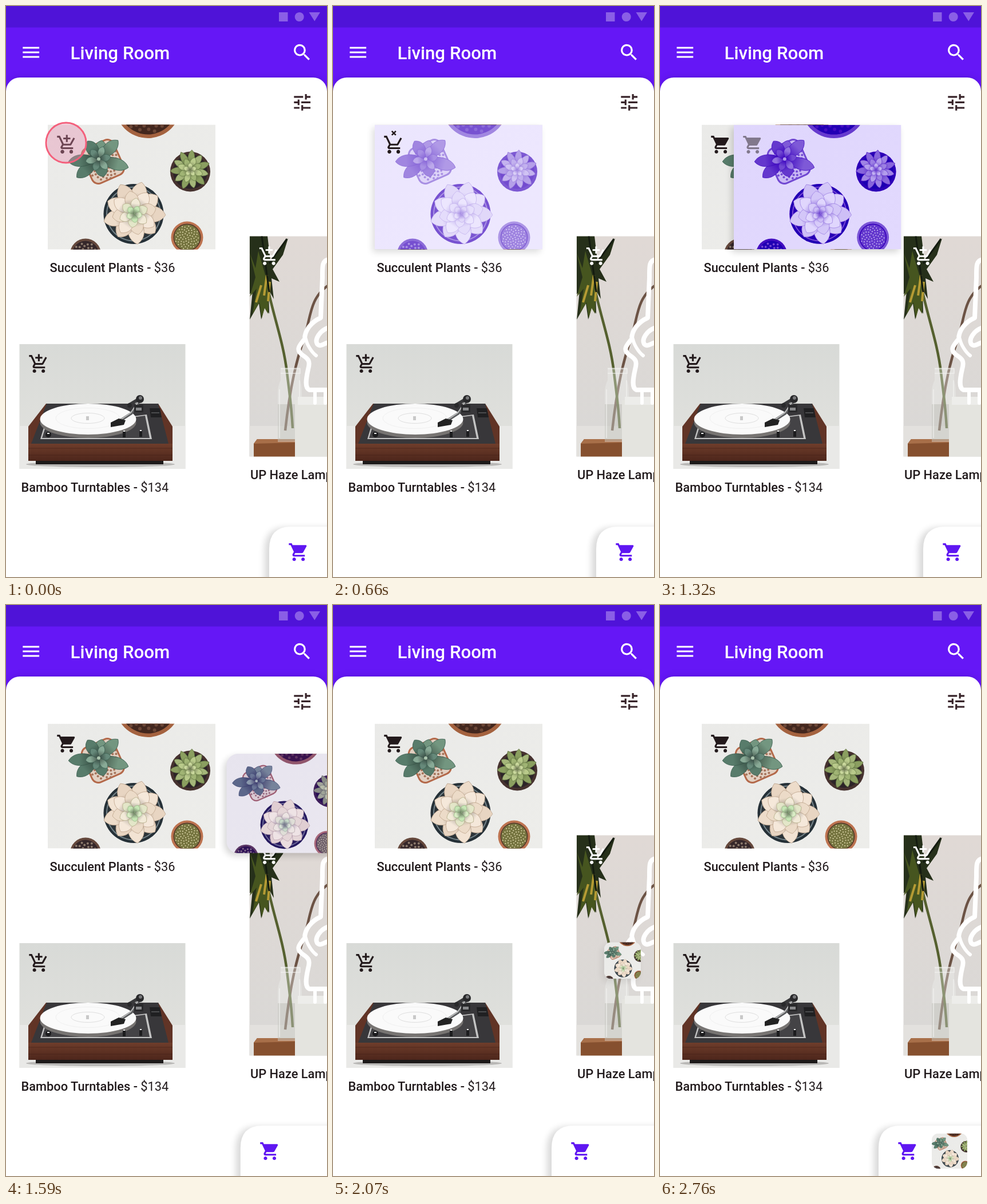
Animation of 561 by 998 pixels, one loop 2790 ms. Source, as an HTML page:

```html
<!DOCTYPE html>
<html lang="en">
<head>
<meta charset="utf-8">
<title>Living Room</title>
<style>
html, body { margin: 0; width: 100%; height: 100%; overflow: hidden; background: #fff; }
svg { display: block; }
text { font-family: Roboto, Arial, sans-serif; font-weight: 500; font-size: 21.8px; fill: #211a1c; }
.price { font-weight: 400; }
</style>
</head>
<body>
<svg width="561" height="998" viewBox="0 0 561 998">
<defs>
  <path id="basket" d="M7 18c-1.1 0-1.99.9-1.99 2S5.9 22 7 22s2-.9 2-2-.9-2-2-2zm10 0c-1.1 0-1.99.9-1.99 2s.89 2 1.99 2 2-.9 2-2-.9-2-2-2zm-9.83-3.25l.03-.12.9-1.63h7.45c.75 0 1.41-.41 1.75-1.03l3.86-7.01L19.42 4h-.01l-1.1 2-2.76 5H8.53l-.13-.27L6.16 6l-.95-2-.94-2H1v2h2l3.6 7.59-1.35 2.45c-.16.28-.25.61-.25.96 0 1.1.9 2 2 2h12v-2H7.42c-.13 0-.25-.11-.25-.25z"/>
  <path id="plus" d="M11 9h2V6h3V4h-3V1h-2v3H8v2h3z"/>
  <path id="cart" d="M7 18c-1.1 0-1.99.9-1.99 2S5.9 22 7 22s2-.9 2-2-.9-2-2-2zM1 2v2h2l3.6 7.59-1.35 2.45c-.16.28-.25.61-.25.96 0 1.1.9 2 2 2h12v-2H7.42c-.14 0-.25-.11-.25-.25l.03-.12.9-1.63h7.45c.75 0 1.41-.41 1.75-1.03l3.58-6.49c.08-.14.12-.31.12-.48 0-.55-.45-1-1-1H5.21l-.94-2H1zm16 16c-1.1 0-1.99.9-1.99 2s.89 2 1.99 2 2-.9 2-2-.9-2-2-2z"/>
  <g id="addCart"><use href="#basket"/><use href="#plus"/></g>

  <linearGradient id="wall" x2="0" y2="1"><stop stop-color="#d8dad7"/><stop offset="1" stop-color="#e3e3df"/></linearGradient>
  <linearGradient id="room" x2="0" y2="1"><stop stop-color="#e0d9d5"/><stop offset="1" stop-color="#d9d8d6"/></linearGradient>
  <linearGradient id="wood" x2="0" y2="1"><stop stop-color="#6f3d2b"/><stop offset="1" stop-color="#4d261b"/></linearGradient>
  <linearGradient id="table" x2="1" y2="1"><stop stop-color="#eaeae8"/><stop offset="1" stop-color="#ededea"/></linearGradient>
  <linearGradient id="fold" x2="0" y1="1" y2="0"><stop stop-opacity=".5"/><stop offset=".65" stop-opacity="0"/></linearGradient>

  <filter id="blur" x="-50%" y="-50%" width="200%" height="200%"><feGaussianBlur stdDeviation="6"/></filter>
  <filter id="tint" color-interpolation-filters="sRGB"><feColorMatrix id="matrix"/></filter>
  <clipPath id="cardClip"><rect class="card"/></clipPath>
  <clipPath id="fillClip"><rect id="level" width="24" height="24"/></clipPath>
  <clipPath id="lampClip"><rect x="425.5" y="402.5" width="136" height="385"/></clipPath>
  <clipPath id="deckClip"><rect x="23.5" y="591" width="290" height="218"/></clipPath>
  <g id="plants"></g>
</defs>

<!-- bars -->
<rect width="561" height="170" fill="#6517f6"/>
<rect width="561" height="37.5" fill="#4f13d8"/>
<g fill="#8a5fe6"><path d="M477 11h15.500v16H477zM529.500 11h19.500l-9.700 15.500z"/><circle cx="512.7" cy="19" r="8"/></g>
<path d="M29.300 73h28.800M29.300 81h28.800M29.300 89h28.800" stroke="#fff" stroke-width="3.1"/>
<text x="112.5" y="93" style="font-size:31.3px;fill:#fff">Living Room</text>
<path transform="translate(498.2 62)scale(1.6)" fill="#fff" d="M15.500 14h-.79l-.28-.27A6.470 6.470 0 0 0 16 9.500 6.500 6.500 0 1 0 9.500 16c1.610 0 3.090-.59 4.230-1.570l.27.28v.79l5 4.990L20.490 19l-4.990-5zm-6 0a4.500 4.500 0 1 1 0-9 4.500 4.500 0 0 1 0 9z"/>
<rect y="123" width="561" height="100" rx="25" fill="#2a0a90" opacity=".22" filter="url(#blur)"/>
<path d="M0 998V149a24 24 0 0 1 24-24H537a24 24 0 0 1 24 24V998z" fill="#fff"/>
<path transform="translate(498.5 149.2)scale(1.6)" fill="#38242a" d="M3 17v2h6v-2H3zM3 5v2h10V5H3zm10 16v-2h8v-2h-8v-2h-2v6h2zM7 9v2H3v2h4v2h2V9H7zm14 4v-2H11v2h10zm-6-4h2V7h4V5h-4V3h-2v6z"/>

<text x="76.5" y="465">Succulent Plants - <tspan class="price">$36</tspan></text>
<text x="26.5" y="848.5">Bamboo Turntables - <tspan class="price">$134</tspan></text>
<text x="427" y="826.5">UP Haze Lamp</text>

<!-- turntable -->
<g clip-path="url(#deckClip)">
  <path d="M23 591h291v219H23z" fill="url(#wall)"/>
  <path d="M23 734h291v76H23z" fill="#e9e9e7"/>
  <ellipse cx="165" cy="801" rx="130" ry="5" fill="#b9b8b6"/>
  <path d="M52 793h223v8H52z" fill="#1d1a1a"/>
  <path d="M70 695H266L291 735V766H39V735z" fill="#613426"/>
  <path d="M71 695H266L284 765H44z" fill="#38373a"/>
  <path d="M66 737L60 757H255L246 714z" fill="#c4c4c4"/>
  <path d="M68 739L63 755H251L243 716z" fill="#444346"/>
  <path d="M39 765H291V795H39z" fill="url(#wood)"/>
  <path d="M39 773h252M39 785h252" stroke="#3d1d15" opacity=".5"/>
  <ellipse cx="143.5" cy="728" rx="84" ry="27" fill="#777472"/>
  <ellipse cx="143.5" cy="722" rx="84" ry="27" fill="#fafafa"/>
  <g fill="none" stroke="#dedede"><ellipse cx="143" cy="720.5" rx="29" ry="9"/><ellipse cx="143" cy="720.5" rx="56" ry="18" stroke="#f0f0f0"/></g>
  <path d="M140 717h5v7h-5z" fill="#c9c9c9"/>
  <path d="M232 692L219 712L199 725" fill="none" stroke="#5b5c5e" stroke-width="5" stroke-linejoin="round"/>
  <path d="M231 692L218 711L199 724" fill="none" stroke="#b9baba" stroke-width="2"/>
  <path d="M183 728l14-7 12 3-3 8-23 4z" fill="#222"/>
  <path d="M214 698L234 686" stroke="#38383a" stroke-width="6"/>
  <g fill="#29292b"><circle cx="234" cy="687" r="7"/><circle cx="216" cy="698" r="4"/><path d="M224 697h16v13h-16z"/></g>
  <circle cx="235" cy="685" r="3" fill="#77787a"/>
  <path d="M227 702h10v5h-10z" fill="#88898b"/>
  <path d="M251 703h18l3 16h-19z" fill="#202022"/>
  <path d="M254 711h14" stroke="#77787a"/>
  <g fill="#1c1c1e"><circle cx="74" cy="749" r="5"/><path d="M204 744h5v10h-5zM233 743h5v10h-5z"/></g>
  <path d="M205 743h3M234 742h3M72 747h4" stroke="#eee" stroke-width="2"/>
</g>
<use href="#addCart" transform="translate(38.8 607)scale(1.55)" fill="#231a1c"/>

<!-- lamp -->
<g clip-path="url(#lampClip)">
  <path d="M425 402h137v386H425z" fill="url(#room)"/>
  <path d="M425 734h80v53h-80z" fill="#e3e1de"/>
  <path d="M433 765l6-8h66v31h-72z" fill="#86502f"/><path d="M433 765l6-8h66v6z" fill="#a86f49"/>
  <g fill="none">
    <path d="M562 489C530 512 533 545 521 580S497 660 488 742" stroke="#6c5345" stroke-width="4.5"/>
    <path d="M459 500C470 550 485 590 491 640S499 700 501 738" stroke="#55602f" stroke-width="4.5"/>
  </g>
  <path d="M426 402h31l5 42 31-38-9 29-18 25 12 22-14-6 4 36-9-16 1 42-8-12-6 22-4-28-16 28 5-50-5 6z" fill="#26301a"/>
  <path d="M426 432l10 26 5-30 12 42 7 12-2 56-6-10-5 18-4-28-12 20 7-44-12 14 10-34z" fill="#46551f"/>
  <path d="M456 470l-5 36M446 488l-9 30M461 482l-3 34" stroke="#b59b34" stroke-width="4"/>
  <path d="M447 402l13 98M460 450l31-43" stroke="#141b10" stroke-width="3"/>
  <path d="M480 632h34v22q3 10 3 22v86h-42v-86q0-12 5-22z" fill="#eff0ee" opacity=".36"/>
  <path d="M475 696h42v64h-42z" fill="#85857a" opacity=".2"/>
  <path d="M480 634h34v8h-34M478 670v85M513 654v34" fill="none" stroke="#f6f6f4" stroke-width="1.5" opacity=".7"/>
  <path d="M505 689h57v99h-57z" fill="#e4e4df"/><path d="M510 683h52v14h-52z" fill="#ededea"/>
  <g fill="none" stroke="#fff" stroke-linecap="round" stroke-linejoin="round" stroke-width="8">
    <path d="M564 443C552 445 553 455 553 475L550 545C532 553 522 568 522 582C509 597 508 602 518 610C529 617 532 621 528 635C524 653 522 667 530 671H564"/>
    <path d="M564 562C548 567 539 583 544 591C550 597 556 589 564 588"/>
    <path d="M524 582C526 592 534 605 542 611" stroke-width="6"/>
    <path d="M540 674v20M558 674v20" stroke-width="6"/>
  </g>
</g>
<use href="#addCart" transform="translate(441.3 418.8)scale(1.55)" fill="#fff"/>

<!-- product photo left in place -->
<svg x="73" y="207.5" width="293" height="218" viewBox="0 0 293 218"><use href="#plants"/></svg>
<use href="#cart" transform="translate(87.7 223.7)scale(1.55)" fill="#231a1c"/>

<g id="sheet">
  <path d="M0 1030V950Q0 910 36 910H240V1030z" transform="translate(-8 2)" filter="url(#blur)" opacity=".15"/>
  <path d="M0 998V949Q0 910 38 910H240V998z" fill="#fff"/>
  <use href="#cart" transform="translate(32.8 936)scale(1.55)" fill="#5f16f2"/>
</g>

<!-- flying card -->
<g id="shade"><rect class="card" transform="translate(-4 5)" filter="url(#blur)"/></g>
<g clip-path="url(#cardClip)">
  <svg class="card" viewBox="0 0 293 218" preserveAspectRatio="xMidYMid slice"><g filter="url(#tint)"><use href="#plants"/></g></svg>
</g>
<g id="cardCart" fill="#231a1c">
  <use id="empty" href="#basket"/>
  <g clip-path="url(#fillClip)"><use href="#cart"/></g>
  <use id="cross" href="#plus"/>
</g>
<circle id="touch" cx="105" cy="239" r="35" fill="#e58cae" fill-opacity=".38" stroke="#f4607c" stroke-width="3"/>
</svg>

<script>
const $ = id => document.getElementById(id);
const set = (el, attrs) => { for (const k in attrs) el.setAttribute(k, attrs[k]); };

// ---- plants ----
const disc = (x, y, r, fill) => `<circle cx="${x}" cy="${y}" r="${r}" fill="${fill}"/>`;

// a pointed petal, shaded towards its base
function petal(x, y, angle, len, w, fill, edge) {
  const d = `M0 0C${-w * .6} ${-len * .2} ${-w * 1.3} ${-len * .75} 0 ${-len}C${w * 1.3} ${-len * .75} ${w * .6} ${-len * .2} 0 0`;
  return `<g transform="translate(${x} ${y})rotate(${angle})">
    <path d="${d}" fill="${fill}" stroke="${edge}" stroke-width=".8"/><path d="${d}" fill="url(#fold)"/></g>`;
}

const ring = (x, y, n, len, w, turn, fills, edge) => Array.from({ length: n }, (_, i) =>
  petal(x, y, turn + i * 360 / n, len * (1 - .08 * (i % 2)), w, fills[i % fills.length], edge)).join('');

const dots = (x, y, r, n, size, fill) => Array.from({ length: n }, (_, i) => {
  const a = i * 2.4, d = r * Math.sqrt((i + .5) / n);
  return disc((x + d * Math.cos(a)).toFixed(1), (y + d * Math.sin(a)).toFixed(1), size, fill);
}).join('');

const leaves = [[165, 32], [10, 33], [-32, 37], [46, 47], [-130, 50], [106, 54], [-95, 53]];
$('plants').innerHTML =
  '<rect width="293" height="218" fill="url(#table)"/>' +
  disc(175, -34, 57.5, '#a4623f') + disc(175, -34, 51, '#43271e') + dots(175, -34, 48, 70, 3, '#6b4636') +
  '<rect x="66" y="32" width="60" height="66" rx="12" transform="rotate(-24 95 64)" fill="#e2d0c2" stroke="#b4694a" stroke-width="3"/>' +
  dots(96, 66, 31, 80, 2, '#a5735a') +
  leaves.map(([a, l], i) => petal(89, 60, a, l, 14, ['#587c6b', '#739680'][i % 2], '#3c5f50')).join('') +
  ring(89, 60, 6, 23, 8, 20, ['#88aa96', '#66897a'], '#43675a') + disc(89, 60, 3, '#a9c3ad') +
  disc(249, 82, 35, '#46322f') + disc(249, 82, 30, '#2d2428') +
  ring(249, 79, 11, 35, 8, 5, ['#8b9f60', '#a5b67a'], '#5d7040') +
  ring(249, 79, 8, 23, 7, 20, ['#b9ca8b', '#a0b474'], '#6f844b') + ring(249, 79, 5, 12, 5, 0, ['#cbd99e'], '#8ea165') +
  disc(150, 156, 52.5, '#253037') + disc(150, 156, 48, '#75848a') + disc(150, 156, 46, '#2c3439') +
  ring(151, 154, 9, 55, 19, 14, ['#eddcca', '#f2e3d3', '#e8d5c2'], '#bda48d') +
  ring(151, 154, 8, 42, 16, 34, ['#f5e8da', '#ecdbc8'], '#c2a991') +
  ring(151, 155, 6, 27, 11, 8, ['#f2ead8', '#e3e6c8'], '#b8b18d') +
  ring(151, 156, 5, 15, 7, 30, ['#c6e6b5', '#d9ecc5'], '#9dbf8b') +
  disc(243.5, 197, 28, '#bd7350') + disc(243.5, 197, 24, '#54382a') + disc(243.5, 197, 22.5, '#75743f') +
  dots(243.5, 197, 21, 65, 1.1, '#d3cda0') +
  disc(66, 226, 27, '#65483c') + disc(66, 226, 23, '#35272a') + dots(66, 226, 21, 35, 2, '#8d7b6d');

// ---- motion ----
const ease = (t, from, to) => {
  const x = Math.min(1, Math.max(0, (t - from) / (to - from)));
  return x * x * (3 - 2 * x);
};
const mix = (a, b, k) => a + (b - a) * k;

const DARK = [.25, .04, .75], LIGHT = [.9, .87, 1], LUMA = [.3, .59, .11];
const GAIN = 1.55, BIAS = -.46;
// k blends to a high-contrast violet duotone, veil bleaches the result
function tintMatrix(k, veil) {
  const rows = DARK.map((dark, c) => {
    const span = LIGHT[c] - dark;
    return [
      ...LUMA.map((l, i) => (1 - veil) * mix(+(i === c), l * GAIN * span, k)),
      0, (1 - veil) * (dark + BIAS * span) * k + veil
    ].map(v => v.toFixed(4)).join(' ');
  });
  return rows.join(' ') + ' 0 0 0 1 0';
}

function draw(t) {
  const crop = ease(t, 1320, 1785);
  const h = mix(218, 62, ease(t, 1300, 2130));
  const w = h * mix(293 / 218, 1, crop);
  const x = mix(219.5, 506, ease(t, 1181, 1676)) - w / 2;
  const y = mix(316.5, 954.5, ease(t, 1412, 2770)) - h / 2;
  document.querySelectorAll('.card').forEach(el =>
    set(el, { x, y, width: w, height: h, rx: .19 * h * crop }));

  const k = ease(t, 80, 450) - ease(t, 1390, 1710);
  const veil = .42 * (ease(t, 80, 450) - ease(t, 600, 950));
  set($('matrix'), { values: tintMatrix(k, veil) });
  set($('shade'), { opacity: .16 * ease(t, 150, 850) - .08 * ease(t, 1700, 2050) - .08 * ease(t, 2400, 2700) });

  const fill = ease(t, 750, 1130), lift = ease(t, 150, 550), drop = ease(t, 900, 1100);
  set($('cardCart'), {
    transform: `translate(${x + 14.7} ${y + 16.2})scale(1.55)`,
    opacity: Math.min(1, Math.max(0, (1460 - t) / 280))
  });
  set($('level'), { y: mix(14, 0, fill) });
  set($('empty'), { opacity: 1 - ease(t, 1060, 1150) });
  set($('cross'), {
    transform: `translate(12 ${5 - 6 * lift + 6 * drop})rotate(${45 * lift})scale(${(1 - .2 * lift) * (1 - ease(t, 960, 1100))})translate(-12 -5)`
  });

  set($('touch'), { opacity: 1 - ease(t, 30, 400) });
  set($('sheet'), { transform: `translate(${mix(460, 382, ease(t, 1400, 1720))} 0)` });
}

const start = performance.now();
function loop() {
  draw((performance.now() - start) % 2790);
  requestAnimationFrame(loop);
}
loop();
</script>
</body>
</html>
```
